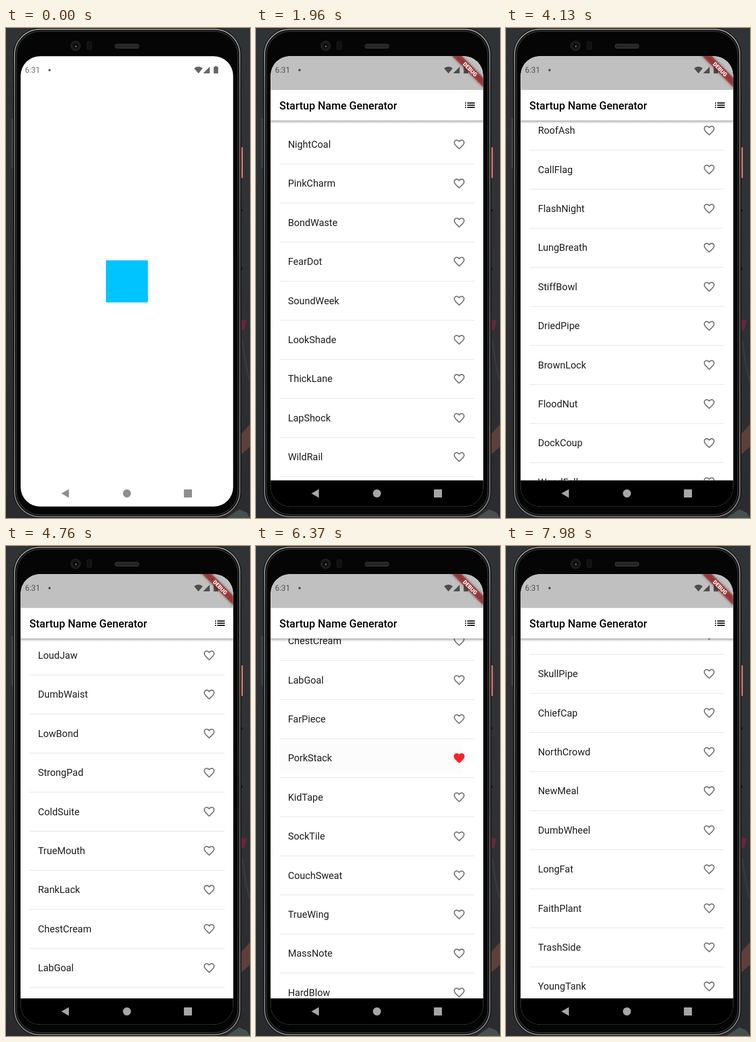
Write an HTML page that moves like this. It is 454 px wide and 908 px high and loops after 8000 ms.

```html
<!DOCTYPE html>
<html lang="en">
<head>
<meta charset="utf-8">
<title>Startup Name Generator</title>
<style>
  html, body { margin: 0; width: 100%; height: 100%; overflow: hidden; background: #2c2e31; }
  svg { display: block; width: 454px; height: 908px; font-family: Roboto, sans-serif; }
</style>
</head>
<body>
<svg viewBox="0 0 454 908">
  <defs>
    <clipPath id="screen"><rect x="27.3" y="52.3" width="395.3" height="834.5" rx="36"/></clipPath>
    <clipPath id="body"><rect x="27" y="171.5" width="396" height="667"/></clipPath>
    <clipPath id="tile"><rect x="43.6" y="-28" width="362.6" height="56"/></clipPath>
    <linearGradient id="shade" x2="0" y2="1">
      <stop stop-opacity=".36"/><stop offset=".4" stop-opacity=".16"/><stop offset="1" stop-opacity="0"/>
    </linearGradient>
    <linearGradient id="backdrop" x2="0" y2="1">
      <stop stop-color="#303336"/><stop offset=".5" stop-color="#2f3134"/><stop offset="1" stop-color="#292b2f"/>
    </linearGradient>
    <linearGradient id="rim" x2="0" y2="1">
      <stop stop-color="#a2a4a4"/><stop offset=".12" stop-color="#777"/>
      <stop offset=".5" stop-color="#606060"/><stop offset="1" stop-color="#858585"/>
    </linearGradient>
    <filter id="blur" x="-20%" y="-100%" width="140%" height="300%"><feGaussianBlur stdDeviation="2.5"/></filter>
    <path id="heart" transform="translate(366 -12.1) scale(1.006)" d="M16.5 3c-1.74 0-3.41.81-4.5 2.09C10.91 3.81 9.24 3 7.5 3 4.42 3 2 5.42 2 8.5c0 3.78 3.4 6.86 8.55 11.54L12 21.35l1.45-1.32C18.6 15.36 22 12.28 22 8.5 22 5.42 19.58 3 16.5 3zm-4.4 15.55l-.1.1-.1-.1C7.14 14.24 4 11.39 4 8.5 4 6.5 5.5 5 7.5 5c1.54 0 3.04.99 3.57 2.36h1.87C13.46 5.99 14.96 5 16.5 5c2 0 3.5 1.5 3.5 3.5 0 2.89-3.14 5.74-7.9 10.05z"/>
    <path id="liked" transform="translate(366 -12.1) scale(1.006)" d="M12 21.35l-1.45-1.32C5.4 15.36 2 12.28 2 8.5 2 5.42 4.42 3 7.5 3c1.74 0 3.41.81 4.5 2.09C13.09 3.81 14.76 3 16.5 3 19.58 3 22 5.42 22 8.5c0 3.78-3.4 6.86-8.55 11.54z"/>
  </defs>

  <!-- backdrop -->
  <rect width="454" height="908" fill="url(#backdrop)"/>
  <path d="M438 540l10 2-5 19-5-2z" fill="#63283a"/>
  <path d="M440 580q6 50 14 74" fill="none" stroke="#383a3e" stroke-width="3"/>
  <path d="M438 752l16-18v42l-16 14z" fill="#5d4039"/>
  <path d="M410 908l24-16 14 6 6 10z" fill="#45504f"/>

  <!-- phone -->
  <path d="M11.5 167v92" stroke="#46484a" stroke-width="2.5"/>
  <rect x="436" y="221" width="4.6" height="57" rx="1.5" fill="#f17c68"/>
  <path d="M439 336v4m0 104v4" stroke="#131416" stroke-width="2"/>
  <rect x="13" y="0" width="425" height="908" rx="50" fill="#151616"/>
  <rect x="16" y="2.5" width="419" height="903" rx="47" fill="#050505" stroke="url(#rim)" stroke-width="2"/>
  <rect x="19.5" y="6" width="412" height="896" rx="44" fill="none" stroke="#2b2c2c" stroke-width="2"/>
  <circle cx="129.500" cy="33" r="9" fill="#191a1b" stroke="#292a2b"/>
  <circle cx="129.500" cy="33" r="4.500" fill="#080909"/>
  <circle cx="130" cy="34" r="1.700" fill="#67706e"/>
  <rect x="150.500" y="25" width="9" height="15" rx="2" fill="#111" stroke="#1b1b1b"/>
  <rect x="203" y="30" width="44" height="7.500" rx="3" fill="#242526" stroke="#3d3e3f"/>

  <g clip-path="url(#screen)">
    <rect x="27" y="52" width="396" height="835" fill="#fff"/>
    <rect x="186" y="430.500" width="78" height="78" fill="#00c4ff"/>

    <g id="app">
      <rect x="27" y="52" width="396" height="787" fill="#fff"/>
      <g clip-path="url(#body)">
        <g id="list">
          <g clip-path="url(#tile)" id="inkBox"><circle id="ink" cx="211.500"/></g>
        </g>
      </g>
      <rect x="27" y="171.500" width="396" height="6" fill="url(#shade)"/>
      <rect x="27" y="52" width="396" height="62.800" fill="#c0c0c0"/>
      <text x="43.500" y="151" font-size="20.120" font-weight="500">Startup Name Generator</text>
      <path transform="translate(386 131) scale(1.006)" d="M3 13h2v-2H3zm0 4h2v-2H3zm0-8h2V7H3zm4 4h14v-2H7zm0 4h14v-2H7zM7 7v2h14V7z"/>
      <rect x="27" y="838.300" width="396" height="50"/>
    </g>

    <g fill-opacity=".6">
      <text x="35.600" y="83" font-size="14.300">6:31</text>
      <circle cx="81" cy="78" r="2.200"/>
      <path d="M350 74.800q8-6.600 16 0l-8 9.400zM367 84V83.800l12-12V84zM388.800 72v-1.400h3.600V72h2.400v12.200h-8.400V72z"/>
    </g>

    <g id="nav">
      <path d="M103 862.500l14-8v16z"/>
      <circle cx="225" cy="862.500" r="7.500"/>
      <rect x="331" y="855" width="15" height="15" rx="1"/>
    </g>

    <g id="banner" transform="translate(422.600 52.300) rotate(45) scale(1.006)">
      <rect x="-62" y="28" width="124" height="12" opacity=".5" filter="url(#blur)"/>
      <rect x="-62" y="28" width="124" height="12" fill="#b71c1c" fill-opacity=".63"/>
      <text y="37.700" font-size="10.200" font-weight="900" fill="#fff" text-anchor="middle">DEBUG</text>
    </g>
  </g>
</svg>
<script>
const LOOP = 8000, STEP = 70, PITCH = 72.4, FIRST = 215.8;
const names = `NightCoal PinkCharm BondWaste FearDot SoundWeek LookShade ThickLane LapShock WildRail
  MildStone RoofAsh CallFlag FlashNight LungBreath StiffBowl DriedPipe BrownLock FloodNut DockCoup
  WoodFall GrayShelf CornPath DeepCrate LoudJaw DumbWaist LowBond StrongPad ColdSuite TrueMouth RankLack
  ChestCream LabGoal FarPiece PorkStack KidTape SockTile CouchSweat TrueWing MassNote HardBlow CleanHalf
  LegBarn TallSeed PlumDesk SkullPipe ChiefCap NorthCrowd NewMeal DumbWheel LongFat FaithPlant TrashSide
  YoungTank FlatRope`.split(/\s+/);

const $ = id => document.getElementById(id);
const rowY = i => FIRST + i * PITCH;
const offsetFor = (name, y) => rowY(names.indexOf(name)) - y;
const clamp = p => Math.max(0, Math.min(1, p));
const span = (t, from, to) => clamp((t - from) / (to - from));

const easeIn = p => p * p;
const easeOut = p => 1 - (1 - p) ** 2;
const easeBoth = p => p * p * (3 - 2 * p);

// start, end, offset reached, easing
const scrolls = [
  [3640, 3990, 705, easeBoth],
  [4060, 4130, offsetFor('RoofAsh', 190), easeIn],
  [4130, 4760, offsetFor('LoudJaw', 202.8), easeOut],
  [4830, 5180, offsetFor('PorkStack', 393.2), easeBoth],
  [7280, 7490, offsetFor('PorkStack', 237.4), easeIn],
  [7490, 7840, offsetFor('SkullPipe', 237), easeOut]
];
const taps = [
  { row: names.indexOf('PorkStack'), at: 6090 },
  { row: names.indexOf('CouchSweat'), at: 6650 }
];

$('list').insertAdjacentHTML('beforeend', names.map((name, i) => `
  <g transform="translate(0 ${rowY(i).toFixed(2)})">
    <text x="59.4" y="6.2" font-size="18.1" fill="#1f1f1f">${name}</text>
    <use href="#heart" fill="#777"/>
    <rect x="43.6" y="35.7" width="362.6" height="1" fill-opacity=".12"/>
  </g>`).join(''));
const hearts = document.querySelectorAll('#list use');

function scrollAt(t) {
  let pos = 0;
  for (const [from, to, goal, ease] of scrolls)
    pos += (goal - pos) * ease(span(t, from, to));
  return pos;
}

function draw(time) {
  const t = Math.floor(time % LOOP / STEP) * STEP;
  const shown = span(t, 840, 1120);
  $('app').setAttribute('opacity', shown);
  $('banner').setAttribute('opacity', shown);
  const grey = 142 + 24 * span(t, 1190, 1540);
  $('nav').setAttribute('fill', `rgb(${grey},${grey},${grey})`);
  $('list').setAttribute('transform', `translate(0 ${-scrollAt(t).toFixed(2)})`);

  let alpha = 0;
  for (const { row, at } of taps) {
    const on = t >= at, p = span(t, at, at + 350);
    hearts[row].setAttribute('href', on ? '#liked' : '#heart');
    hearts[row].setAttribute('fill', on ? '#fb2528' : '#777');
    if (on && p < 1) {
      alpha = .06 * (1 - p);
      $('inkBox').setAttribute('transform', `translate(0 ${rowY(row)})`);
      $('ink').setAttribute('r', 30 + 150 * easeOut(p));
    }
  }
  $('ink').setAttribute('fill-opacity', alpha);
}

const start = performance.now();
function tick() {
  draw(performance.now() - start);
  requestAnimationFrame(tick);
}
tick();
</script>
</body>
</html>
```
